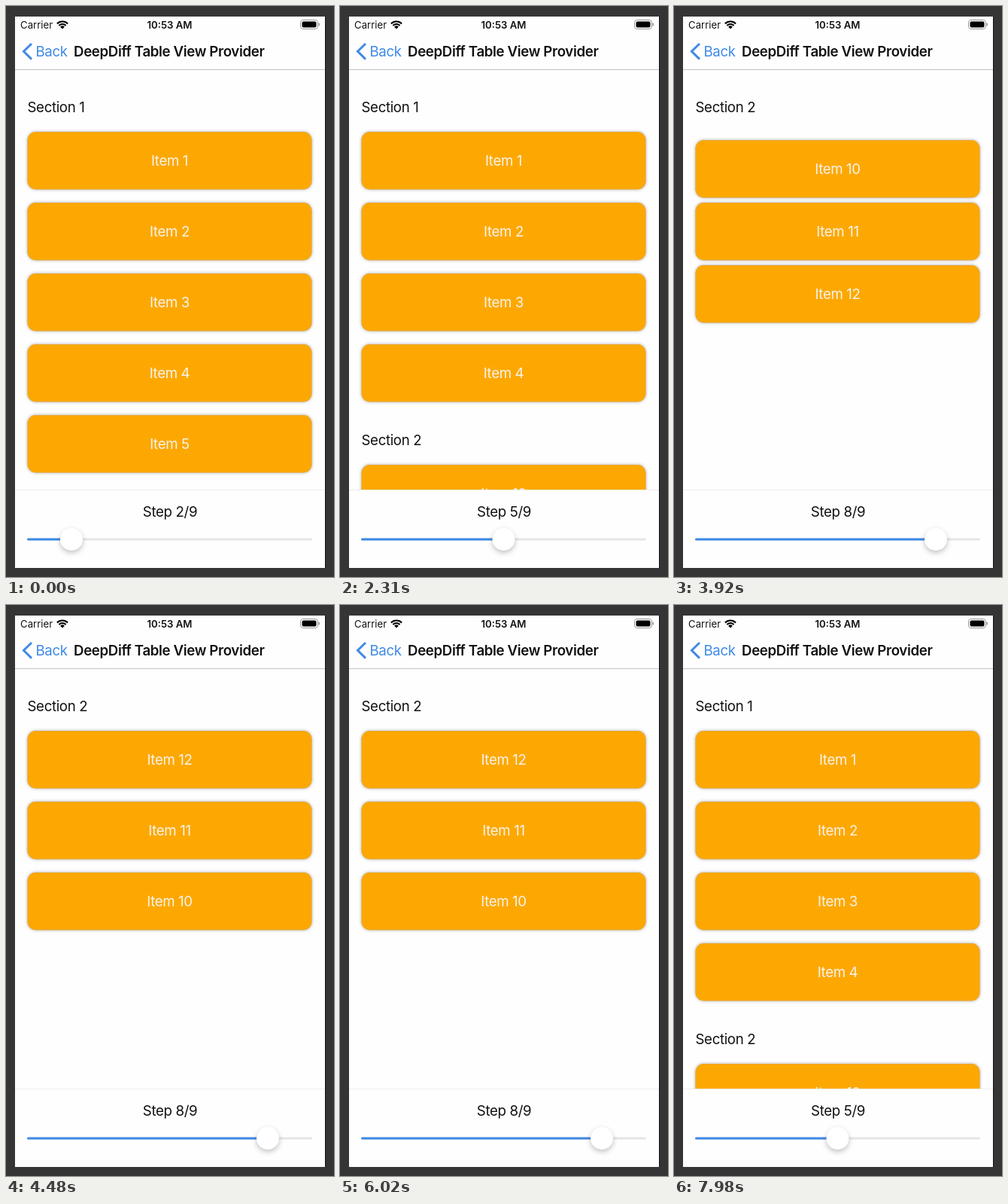
Recreate the animation shown at these times as an HTML page with a canvas. Size 436 by 758 pixels, loop 8000 ms.

```html
<!DOCTYPE html>
<html lang="en">
<head>
<meta charset="utf-8">
<title>Table View Provider</title>
<style>
  html, body { margin: 0; width: 100%; height: 100%; overflow: hidden; background: #353535; }
  canvas { display: block; width: 436px; height: 758px; }
</style>
</head>
<body>
<canvas id="stage"></canvas>
<script>
const W = 436, H = 758, LOOP = 8000;
const SCREEN = { x: 12, y: 14, w: 412, h: 732 };
const TOP = 101, HEADER_H = 66, ROW_H = 94, CARD_H = 77;
const BLUE = '#3f8ae6', ORANGE = '#fda802';
const FONT = 'Inter, "Liberation Sans", sans-serif';

const canvas = document.getElementById('stage');
const dpr = window.devicePixelRatio || 1;
canvas.width = W * dpr;
canvas.height = H * dpr;
const ctx = canvas.getContext('2d');

// Section contents for every slider step
const range = (a, b) => Array.from({ length: b - a + 1 }, (_, i) => a + i);
const one = n => ['Section 1', range(1, n)];
const half = ['Section 1/5', range(6, 9)];
const two = ['Section 2', range(10, 12)];
const STEPS = {
  2: [one(5), half, two],
  3: [one(2), half, two],
  4: [one(4), half, two],
  5: [one(4), two],
  6: [two, one(4)],
  7: [two],
  8: [['Section 2', [12, 11, 10]]],
  9: []
};

// [start, step, duration]
const MOVES = [
  [-1000, 2, 300], [90, 3, 300], [1040, 4, 650], [1840, 5, 300],
  [2540, 6, 300], [3100, 7, 300], [3870, 8, 300], [4570, 9, 300],
  [5480, 8, 300], [6150, 7, 300], [6940, 6, 300], [7480, 5, 300]
];

function layout(sections) {
  const cells = [];
  let y = TOP;
  const add = (key, section, h) => {
    cells.push({ key, section, y, h, header: key === section });
    y += h;
  };
  for (const [name, items] of sections) {
    add(name, name, HEADER_H);
    items.forEach(n => add('Item ' + n, name, ROW_H));
  }
  return cells;
}

const LAYOUTS = {};
for (const step in STEPS) LAYOUTS[step] = layout(STEPS[step]);

const find = (cells, key) => cells.find(c => c.key === key);
const lerp = (a, b, p) => a + (b - a) * p;

// Where a cell missing from `other` collapses to
function collapsedY(cells, key, other) {
  for (let i = cells.findIndex(c => c.key === key) - 1; i >= 0; i--) {
    const near = find(other, cells[i].key);
    if (near) return near.y + near.h;
  }
  return TOP;
}

// cubic-bezier(.42, 0, .58, 1)
function ease(x) {
  if (x <= 0) return 0;
  if (x >= 1) return 1;
  let lo = 0, hi = 1, s = 0.5;
  for (let i = 0; i < 20; i++) {
    s = (lo + hi) / 2;
    const v = 1.26 * s * (1 - s) * (1 - s) + 1.74 * s * s * (1 - s) + s * s * s;
    if (v < x) lo = s; else hi = s;
  }
  return s * s * (3 - 2 * s);
}

function text(str, x, y, { size = 18.7, weight = 400, color = '#111', align = 'left', spacing = -0.37 } = {}) {
  ctx.font = `${weight} ${size}px ${FONT}`;
  ctx.letterSpacing = spacing + 'px';
  ctx.fillStyle = color;
  ctx.textAlign = align;
  ctx.fillText(str, x, y);
}

function rect(x, y, w, h, color) {
  ctx.fillStyle = color;
  ctx.fillRect(x, y, w, h);
}

function round(x, y, w, h, r) {
  ctx.beginPath();
  ctx.roundRect(x, y, w, h, r);
}

function shadow(color, blur, dy) {
  ctx.shadowColor = color;
  ctx.shadowBlur = blur * dpr;
  ctx.shadowOffsetY = dy * dpr;
}

function card(label, x, y) {
  ctx.save();
  shadow('rgba(0,0,0,.32)', 4, 0);
  round(x + 28.5, y, 378, CARD_H - 0.5, 11);
  ctx.fillStyle = ORANGE;
  ctx.fill();
  ctx.restore();
  round(x + 29, y + 0.5, 377, CARD_H - 1.5, 10.5);
  ctx.strokeStyle = 'rgba(215,170,95,.55)';
  ctx.lineWidth = 1;
  ctx.stroke();
  text(label, x + 217.5, y + 45, { color: '#f6f3ee', align: 'center' });
}

function cell(c, x, y, h, stickBottom) {
  ctx.save();
  if (h < c.h) {
    ctx.beginPath();
    ctx.rect(0, y, W, h);
    ctx.clip();
  }
  const top = stickBottom ? y + h - c.h : y;
  if (c.header) text(c.key, x + 28.5, top + 39.5);
  else card(c.key, x, top);
  ctx.restore();
}

function table(from, to, p) {
  ctx.save();
  ctx.beginPath();
  ctx.rect(SCREEN.x, 85, SCREEN.w, 557);
  ctx.clip();
  for (const c of from) {
    if (find(to, c.key)) continue;
    const slide = !find(to, c.section);
    const y = lerp(c.y, collapsedY(from, c.key, to), p);
    if (p < 1) cell(c, slide ? SCREEN.w * p : 0, y, c.h * (1 - p), !slide);
  }
  for (const c of to) {
    const old = find(from, c.key);
    if (old) {
      cell(c, 0, lerp(old.y, c.y, p), c.h, false);
    } else {
      const slide = !find(from, c.section);
      const y = lerp(collapsedY(to, c.key, from), c.y, p);
      cell(c, slide ? SCREEN.w * (p - 1) : 0, y, c.h * p, !slide);
    }
  }
  ctx.restore();
}

function wifi(x, y) {
  ctx.strokeStyle = '#000';
  ctx.lineWidth = 2.1;
  for (const r of [10, 6.5]) {
    ctx.beginPath();
    ctx.arc(x, y, r, -Math.PI * 0.75, -Math.PI * 0.25);
    ctx.stroke();
  }
  ctx.beginPath();
  ctx.moveTo(x, y);
  ctx.arc(x, y, 4, -Math.PI * 0.75, -Math.PI * 0.25);
  ctx.fillStyle = '#000';
  ctx.fill();
}

function battery() {
  round(391.5, 18.5, 23, 12, 3.5);
  ctx.strokeStyle = '#999';
  ctx.lineWidth = 1;
  ctx.stroke();
  round(393.5, 20.5, 19, 8, 2);
  ctx.fillStyle = '#000';
  ctx.fill();
  round(415.5, 22.5, 1.5, 4, 1);
  ctx.fillStyle = '#999';
  ctx.fill();
}

function bars() {
  text('Carrier', 19, 30, { size: 13.2, spacing: 0 });
  wifi(75, 30.5);
  text('10:53 AM', 217.5, 30, { size: 13.2, weight: 600, align: 'center', spacing: 0 });
  battery();

  ctx.beginPath();
  ctx.moveTo(34, 50);
  ctx.lineTo(23.5, 60.3);
  ctx.lineTo(34, 70.6);
  ctx.strokeStyle = BLUE;
  ctx.lineWidth = 3;
  ctx.stroke();
  text('Back', 39.5, 67, { color: BLUE });
  text('DeepDiff Table View Provider', 90, 67, { weight: 600 });
  rect(SCREEN.x, 84, SCREEN.w, 1, '#c4c4c4');
}

function slider(step) {
  const x = 43.5 * step;
  rect(SCREEN.x, 642, SCREEN.w, 1, '#ececec');
  text(`Step ${step}/9`, 218, 678, { align: 'center' });
  round(28, 706.5, 379, 3, 1.5);
  ctx.fillStyle = '#e6e6e7';
  ctx.fill();
  round(28, 706.5, x - 28, 3, 1.5);
  ctx.fillStyle = BLUE;
  ctx.fill();
  ctx.save();
  shadow('rgba(0,0,0,.24)', 7, 3);
  ctx.beginPath();
  ctx.arc(x, 708, 15, 0, Math.PI * 2);
  ctx.fillStyle = '#fff';
  ctx.fill();
  ctx.restore();
}

function draw(t) {
  let i = MOVES.length - 1;
  while (i > 0 && MOVES[i][0] > t) i--;
  const [start, step, span] = MOVES[i];
  const prev = i ? MOVES[i - 1][1] : step;

  ctx.setTransform(dpr, 0, 0, dpr, 0, 0);
  rect(0, 0, W, H, '#353535');
  rect(SCREEN.x, SCREEN.y, SCREEN.w, SCREEN.h, '#fefefe');
  table(LAYOUTS[prev], LAYOUTS[step], ease((t - start) / span));
  bars();
  slider(step);
  rect(424, SCREEN.y, 1, SCREEN.h, '#111');
}

const origin = performance.now();
function tick() {
  draw((performance.now() - origin) % LOOP);
  requestAnimationFrame(tick);
}
tick();
</script>
</body>
</html>
```
